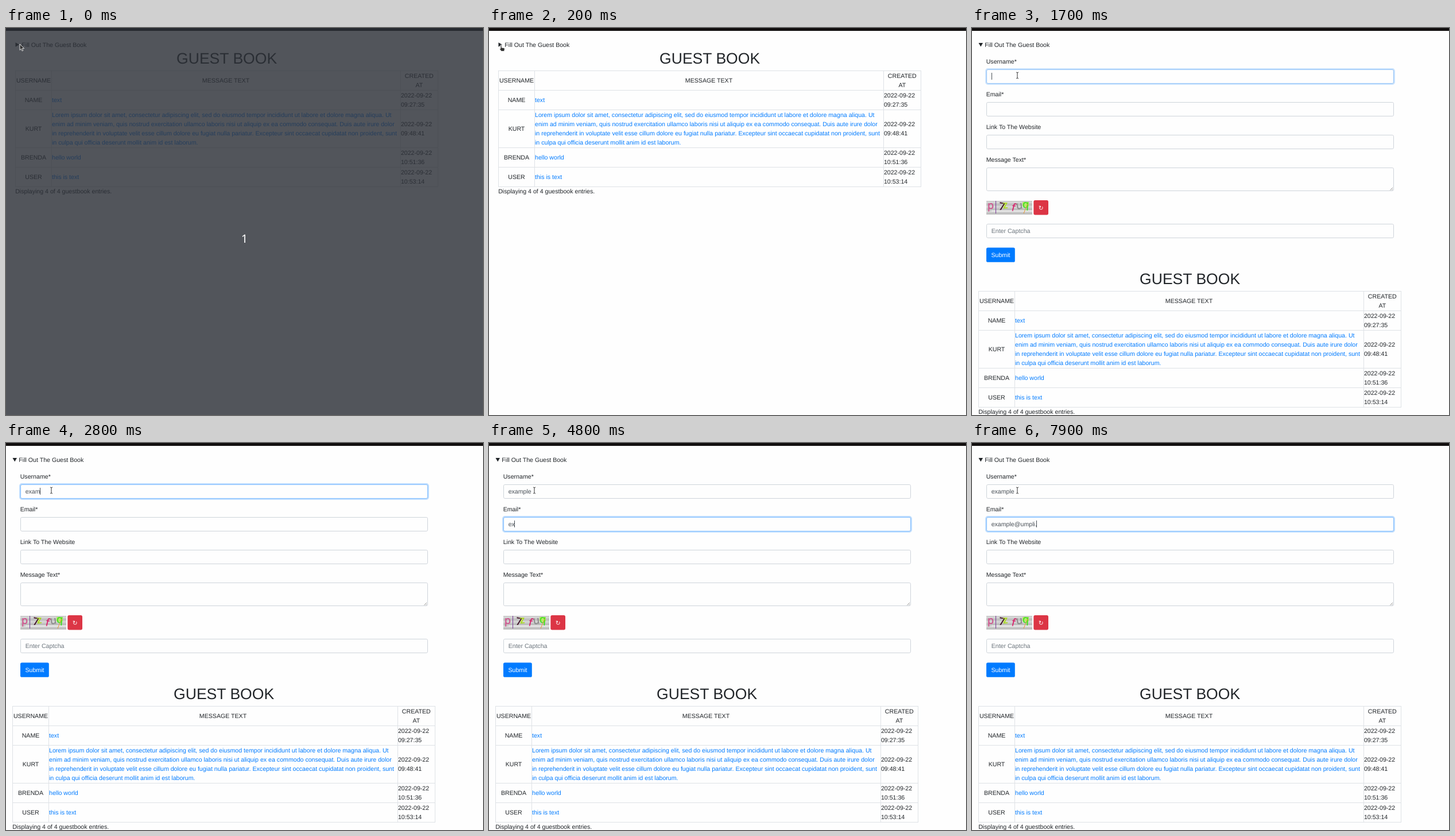
Recreate the animation shown at these times as an HTML page. Size 831 by 674 pixels, loop 8 s.

```html
<!DOCTYPE html>
<html lang="en">
<head>
<meta charset="utf-8">
<title>Guest book</title>
<style>
  html, body { margin: 0; width: 831px; height: 674px; overflow: hidden; background: #fefefe; }
  svg { display: block; }
  text { font: 10.62px "Liberation Sans", Arial, sans-serif; fill: #212529; text-rendering: geometricPrecision; white-space: pre; }
  .mid { text-anchor: middle; }
  .link { fill: #007bff; }
  .value { fill: #495057; }
  .hint { fill: #6c757d; }
  .white { fill: #fff; }
  .title { font-size: 26.55px; }
  .glyph { font-family: "DejaVu Sans", sans-serif; }
  .count { font: 20px "Noto Sans", sans-serif; fill: #fff; }
  .box { fill: #fefefe; stroke: #ced4da; }
  .ring { fill: none; stroke: #007bff; stroke-opacity: .25; stroke-width: 2; }
  .edge { fill: none; stroke: #80bdff; }
  .grid { fill: none; stroke: #dee2e6; }
  .pointer path { fill: #333; stroke: #fff; stroke-width: .8; }
  #captcha text { font: 18px "Open Sans", sans-serif; }
</style>
</head>
<body>
<svg id="stage" width="831" height="674" viewBox="0 0 831 674"></svg>
<script>
const LOOP = 8000;
const stage = document.getElementById('stage');
const $ = id => document.getElementById(id);

const text = (x, y, content, cls = '', extra = '') =>
  `<text x="${x}" y="${y}" class="${cls}" ${extra}>${content}</text>`;
const rect = (x, y, w, h, attrs) => `<rect x="${x}" y="${y}" width="${w}" height="${h}" ${attrs}/>`;
const box = (y, h = 25) => rect(25.5, y + .5, 709, h - 1, 'rx="2.2" class="box"');

// Guest book table, placed as in the collapsed page
const lorem = [
  'Lorem ipsum dolor sit amet, consectetur adipiscing elit, sed do eiusmod tempor incididunt ut labore et dolore magna aliqua. Ut',
  'enim ad minim veniam, quis nostrud exercitation ullamco laboris nisi ut aliquip ex ea commodo consequat. Duis aute irure dolor',
  'in reprehenderit in voluptate velit esse cillum dolore eu fugiat nulla pariatur. Excepteur sint occaecat cupidatat non proident, sunt',
  'in culpa qui officia deserunt mollit anim id est laborum.'
];
const entries = [
  ['NAME', ['text'], '09:27:35'],
  ['KURT', lorem, '09:48:41'],
  ['BRENDA', ['hello world'], '10:51:36'],
  ['USER', ['this is text'], '10:53:14']
];

function table() {
  let out = text(384.6, 62, 'GUEST BOOK', 'mid title') +
    text(48, 95, 'USERNAME', 'mid') + text(383, 95, 'MESSAGE TEXT', 'mid') +
    text(719.8, 87, 'CREATED', 'mid') + text(719.8, 103, 'AT', 'mid');
  let top = 108.5, lines = 'M17 74.5H752.5';
  for (const [user, message, time] of entries) {
    const height = message.length > 1 ? 66 : 34;
    const base = top + height / 2 + 3.5;
    lines += `M17 ${top}H752.5`;
    out += text(48, base, user, 'mid') +
      message.map((m, i) => text(80, base + 16 * i - 8 * (message.length - 1), m, 'link')).join('') +
      text(687.9, base - 8, '2022-09-22') + text(687.9, base + 8, time);
    top += height;
  }
  lines += `M17 ${top}H752.5`;
  for (const x of [16.5, 79.5, 687.5, 752.5]) lines += `M${x} 74V277`;
  return `<path class="grid" d="${lines}"/>` + out +
    text(16.2, 288, 'Displaying 4 of 4 guestbook entries.');
}

function captcha() {
  let out = rect(25, 301, 80, 24, 'fill="#c9c9c9"');
  for (let i = 0; i < 6; i++) {
    out += rect(25, 303 + 4 * i, 80, 1, `fill="${i % 2 ? '#b4b4b4' : '#e4e4e4'}"`);
  }
  out += rect(34, 318, 71, 1, 'fill="#f4f4f4"') + rect(54, 304, 5, 8, 'fill="#d4e88a"') +
    rect(88, 303, 11, 8, 'fill="#b8e86a"');
  const letters = [
    ['p', 27, 315, '#d0508c', 0], ['7', 47, 317, '#3a0a20', 8], ['z', 54, 314, '#a8d820', -4],
    ['f', 69, 319, '#d8206a', 14], ['u', 77, 315, '#8a8a8a', -8], ['q', 88, 313, '#40e020', 4]
  ];
  for (const [c, x, y, color, turn] of letters) {
    out += text(x, y, c, '', `style="fill:${color};stroke:${color};stroke-width:.4" transform="rotate(${turn} ${x + 5} ${y - 5})"`);
  }
  return `<g id="captcha">${out}<path d="M41.5 301V323" stroke="#7a3a9a"/>
    <path d="M97 306L90 323" stroke="#e89a30"/></g>`;
}

function form() {
  const labels = ['Username*', 'Email*', 'Link To The Website', 'Message Text*'];
  return labels.map((l, i) => text(24.7, 62 + 57 * i, l)).join('') +
    [72, 129, 186].map(y => box(y)).join('') + box(243, 41) + box(341) +
    '<path d="M728.5 282.5L733 278M731.5 282.5L733 281" stroke="#777" stroke-width=".8"/>' +
    captcha() +
    rect(107.3, 300, 25.7, 25.4, 'rx="2.67" fill="#dc3545"') + text(120.3, 316.5, '↻', 'mid white glyph') +
    text(33.67, 357.3, 'Enter Captcha', 'hint') +
    rect(25, 382.4, 49.8, 25.4, 'rx="2.67" fill="#007bff"') + text(50, 398.8, 'Submit', 'mid white');
}

const fields = [
  { id: 'user', y: 72, caretY: 78, focus: 1600, blink: 2100, blur: 3700, value: 'example',
    keys: [2200, 2500, 2700, 2800, 3100, 3200, 3300] },
  { id: 'mail', y: 129, caretY: 135, focus: 3700, blink: 4300, blur: Infinity, value: 'example@umpli.',
    keys: [4500, 4800, 5100, 5300, 5500, 5700, 5800, 6200, 6700, 7100, 7300, 7500, 7600, 7900] }
];
const fieldLayer = f => `<g id="${f.id}Focus">` +
  rect(24, f.y - 1, 712, 27, 'rx="3.7" class="ring"') +
  rect(25.5, f.y + .5, 709, 24, 'rx="2.2" class="edge"') + '</g>' +
  text(33.67, f.y + 16, '', 'value', `id="${f.id}Text"`) +
  rect(34, f.caretY, 1, 12, `id="${f.id}Caret" fill="#495057"`);

stage.innerHTML =
  rect(0, 0, 831, 5, 'fill="#120f0f"') +
  '<path id="marker" fill="#212529"/>' +
  text(0, 33, 'Fill Out The Guest Book', '', 'id="summary"') +
  `<g id="form">${form()}${fields.map(fieldLayer).join('')}</g>` +
  `<g id="table">${table()}</g>` +
  `<g id="shade">${rect(0, 0, 831, 674, 'fill="#2c3038" opacity=".82"')}${text(415.5, 374, '1', 'mid count')}</g>` +
  `<g id="cursor">
    <g id="arrow" class="pointer"><path d="M0 0V10.5L2.4 8.3 4 12 5.8 11.2 4.2 7.6H7.6Z"/></g>
    <g id="hand" class="pointer"><path d="M-1 1q1-1.6 2 0V5L5.2 5.8Q6.4 6.2 6.3 7.5L5.6 11.5H.6L-2.4 8Q-2.6 6.6-1 7Z"/></g>
    <g id="beam" fill="none" stroke="#333"><path d="M-2-5.5Q0-5.3 0-4Q0-5.3 2-5.5M0-4V4M-2 5.5Q0 5.3 0 4Q0 5.3 2 5.5"/></g>
  </g>`;

const show = (id, on) => $(id).setAttribute('display', on ? 'inline' : 'none');
const fade = (t, start) => {
  const p = Math.min(1, Math.max(0, (t - start + 40) / 200));
  return p * p * (3 - 2 * p);
};

function drawField(f, t) {
  const typed = f.keys.filter(k => k <= t).length;
  const label = $(f.id + 'Text');
  label.textContent = f.value.slice(0, typed);
  const width = typed ? label.getComputedTextLength() : 0;
  const caret = $(f.id + 'Caret');
  caret.setAttribute('x', Math.max(34, Math.floor(33.75 + width)));
  caret.setAttribute('y', f.caretY + (f.id === 'mail' && !typed ? 1 : 0));
  show(f.id + 'Caret', t >= f.focus && t < f.blur && (typed || t < f.blink));
  $(f.id + 'Focus').setAttribute('opacity', t < f.focus ? 0 : fade(t, f.focus) * (1 - (t < f.blur ? 0 : fade(t, f.blur))));
}

function drawCursor(t) {
  let kind = 'hand', x = t < 200 ? 22.5 : 21, y = 29;
  if (t < 100) [kind, x, y] = ['arrow', 24, 28];
  if (t >= 1100) {
    const p = Math.min(1, (t - 1000) / 400);
    kind = p < 1 ? 'arrow' : 'beam';
    x += (79 - x) * p;
    y += (82.5 - y) * p;
  }
  for (const k of ['arrow', 'hand', 'beam']) show(k, k === kind);
  $('cursor').setAttribute('transform', `translate(${x} ${y})`);
}

function draw(now) {
  const t = Math.floor(now % LOOP / 100) * 100;
  const open = t >= 700;
  show('shade', t < 100);
  show('form', open);
  $('table').setAttribute('transform', open ? 'translate(-5 384)' : '');
  $('summary').setAttribute('x', open ? 22.3 : 27.3);
  $('marker').setAttribute('d', open ? 'M11.5 26H19L15.25 32.5Z' : 'M16.5 25.3L23 29 16.5 32.8Z');
  fields.forEach(f => drawField(f, t));
  drawCursor(t);
}

const start = performance.now();
function tick() {
  draw(performance.now() - start);
  requestAnimationFrame(tick);
}
tick();
</script>
</body>
</html>
```
